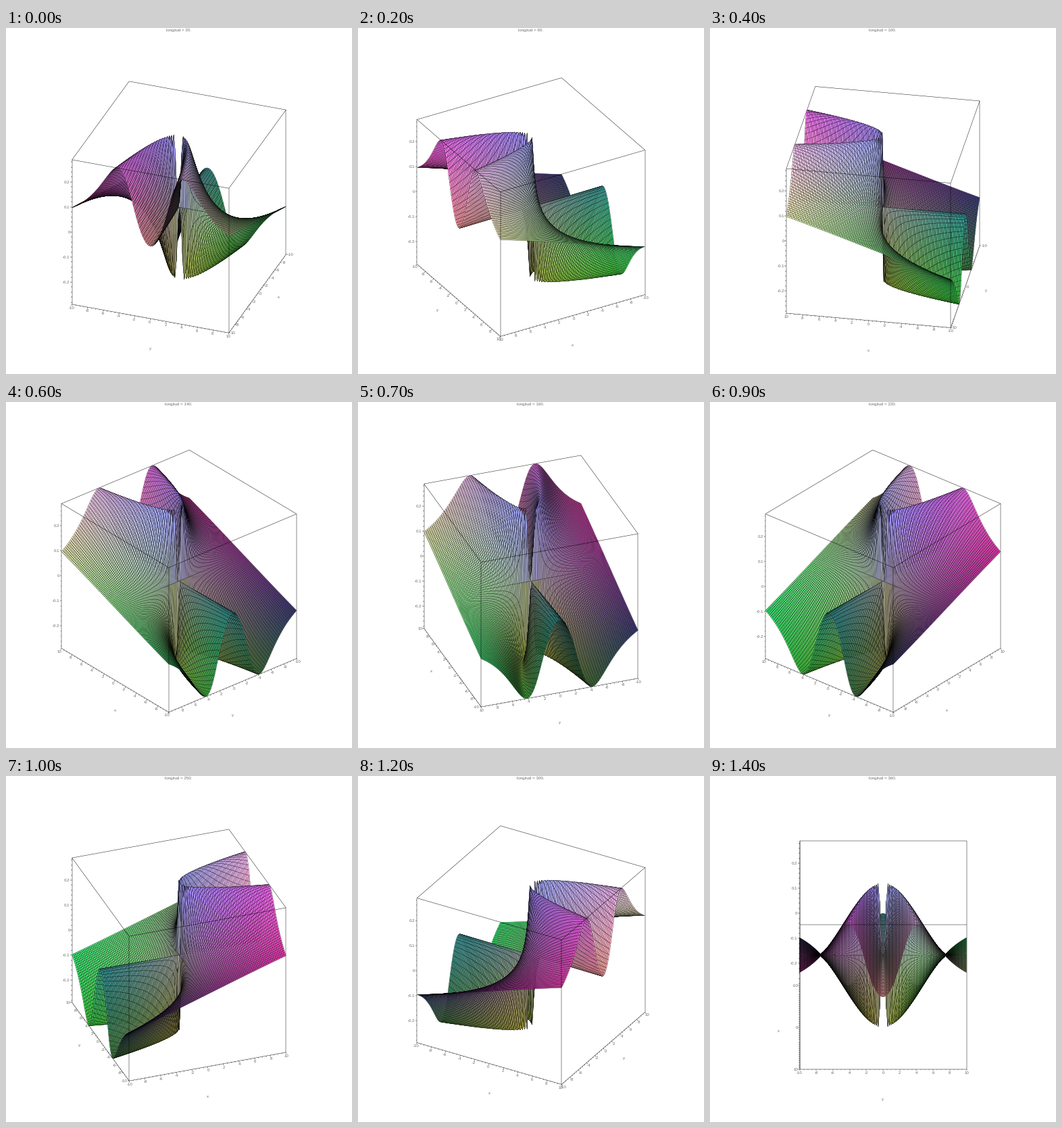
Animation, 512 px wide and 512 px high, one loop 1500 ms. Source, as a matplotlib script:

```python
import numpy as np
import matplotlib.pyplot as plt
from matplotlib.animation import FuncAnimation
from matplotlib.collections import LineCollection, PolyCollection

SIZE, DPI = 512, 100
PT = 72 / DPI                      # points per pixel
CX, CY = 256.0, 265.0              # centre of the box on the stage
XY_PX = 12.35                      # pixels per x or y unit
Z_MAX = 1 / (2 * np.sqrt(3))
Z_PX = 10 * XY_PX / Z_MAX
TILT = np.radians(30)
TEXT = "#6c6c6c"
CORNERS = [(10, -10), (10, 10), (-10, 10), (-10, -10)]
ANGLES = [*range(20, 181, 20), 220, 250, 280, 300, 330, 360]


def surface(x, y):
    bottom = 3 * x**2 + y**4
    return np.where(bottom > 0, x * y**2 / np.where(bottom > 0, bottom, 1), 0)


def cells(a):
    """Corner values of every grid cell, one row per cell."""
    parts = (a[:-1, :-1], a[1:, :-1], a[1:, 1:], a[:-1, 1:])
    return np.stack([p.ravel() for p in parts], axis=1)


axis = np.round(np.linspace(-10, 10, 101), 6)
gx, gy = np.meshgrid(axis, axis, indexing="ij")
QX, QY, QZ = cells(gx), cells(gy), cells(surface(gx, gy))
shade = np.stack([QX.mean(1) / 10, QY.mean(1) / 10, QZ.mean(1) / Z_MAX], axis=1)
COLORS = 0.22 + 0.78 * (shade + 1) / 2


def project(x, y, z, turn):
    """Stage position and nearness to the viewer."""
    s, c = np.sin(turn), np.cos(turn)
    toward = XY_PX * (x * c + y * s)
    px = CX + XY_PX * (y * c - x * s)
    py = CY + toward * np.sin(TILT) - Z_PX * z * np.cos(TILT)
    return px, py, toward * np.cos(TILT) + Z_PX * z * np.sin(TILT)


fig = plt.figure(figsize=(SIZE / DPI, SIZE / DPI), dpi=DPI, facecolor="white")
ax = fig.add_axes([0, 0, 1, 1])


def label(x, y, s, ha="center"):
    ax.text(x, y, s, ha=ha, va="center_baseline", color=TEXT, zorder=5,
            fontsize=6.1 * PT, family="Liberation Sans")


def lines(segments, zorder):
    ax.add_collection(LineCollection(segments, colors="black", linewidths=0.45 * PT,
                                     zorder=zorder))


def floor_edge(front, far, turn):
    """End points of a lower edge and whether it runs nearly level."""
    p0, p1 = (np.array(project(*c, -Z_MAX, turn)[:2]) for c in (front, far))
    dx, dy = np.abs(p1 - p0)
    return p0, p1, dy < 0.7 * dx


def draw_z_axis(corner, turn):
    ticks = []
    for i in range(-14, 15):
        x, y, _ = project(*corner, i * 0.02, turn)
        major = i % 5 == 0
        ticks.append([(x, y), (x - (2.5 if major else 1.5), y)])
        if major:
            label(x - 3, y, f"{i * 0.02:.1f}" if i else "0", "right")
    lines(ticks, 4)


def draw_floor_axis(front, far, side, turn, skip_first=False):
    """Ticks, numbers and name on one lower front edge; side is -1 or 1."""
    along = 0 if front[0] != far[0] else 1
    p0, p1, level = floor_edge(front, far, turn)
    dx, dy = np.abs(p1 - p0)
    length = np.hypot(dx, dy)
    steep = dy > dx
    out = np.array([side, 0]) if steep else np.array([side * dy, dx]) / length
    step = 2 if length > 135 else 10
    start, end = front[along], far[along]
    ticks = []
    for i in range(-20, 21):
        value = i / 2
        p = p0 + (p1 - p0) * (value - start) / (end - start)
        major = value % step == 0
        ticks.append([p, p + out * (2.4 if major else 1.3)])
        if not major or (skip_first and value == start):
            continue
        if steep:
            label(p[0] + 2.5 * side, p[1], f"{value:.0f}", "left" if side > 0 else "right")
        else:
            label(*(p + out * 5), f"{value:.0f}")
    lines(ticks, 4)

    offset = (0, 44) if level else (31 * side, 5 if steep else 14)
    label(*((p0 + p1) / 2 + offset), "xy"[along])


def draw(i):
    degrees = ANGLES[i]
    turn = np.radians(degrees)
    ax.clear()
    ax.set(xlim=(0, SIZE), ylim=(SIZE, 0))
    ax.axis("off")

    k = -(-degrees // 90)
    left, front, right, back = (CORNERS[(k + j) % 4] for j in (-1, 0, 1, 2))

    def edge(a, za, b, zb):
        return [project(*a, za, turn)[:2], project(*b, zb, turn)[:2]]

    hi, lo = Z_MAX, -Z_MAX
    lines([edge(left, hi, back, hi), edge(back, hi, right, hi),
           edge(left, lo, left, hi), edge(right, lo, right, hi)], 1)

    px, py, near = project(QX, QY, QZ, turn)
    order = np.argsort(near.mean(1), kind="stable")
    quads = np.stack([px, py], axis=2)[order]
    ax.add_collection(PolyCollection(quads, facecolors=COLORS[order], edgecolors="black",
                                     linewidths=0.3 * PT, zorder=2))

    lines([edge(left, hi, front, hi), edge(front, hi, right, hi),
           edge(front, lo, front, hi), edge(left, lo, front, lo),
           edge(front, lo, right, lo)], 3)

    draw_z_axis(left, turn)
    # The two numbers at the front corner collide when both edges are level.
    crowded = all(floor_edge(front, c, turn)[2] for c in (left, right))
    draw_floor_axis(front, left, -1, turn)
    draw_floor_axis(front, right, 1, turn, crowded)
    label(255.5, 3, f"longitud = {degrees}.")
    return ax.get_children()


anim = FuncAnimation(fig, draw, frames=len(ANGLES), interval=100, repeat=True,
                     init_func=lambda: draw(0), blit=False)
plt.show()
```
